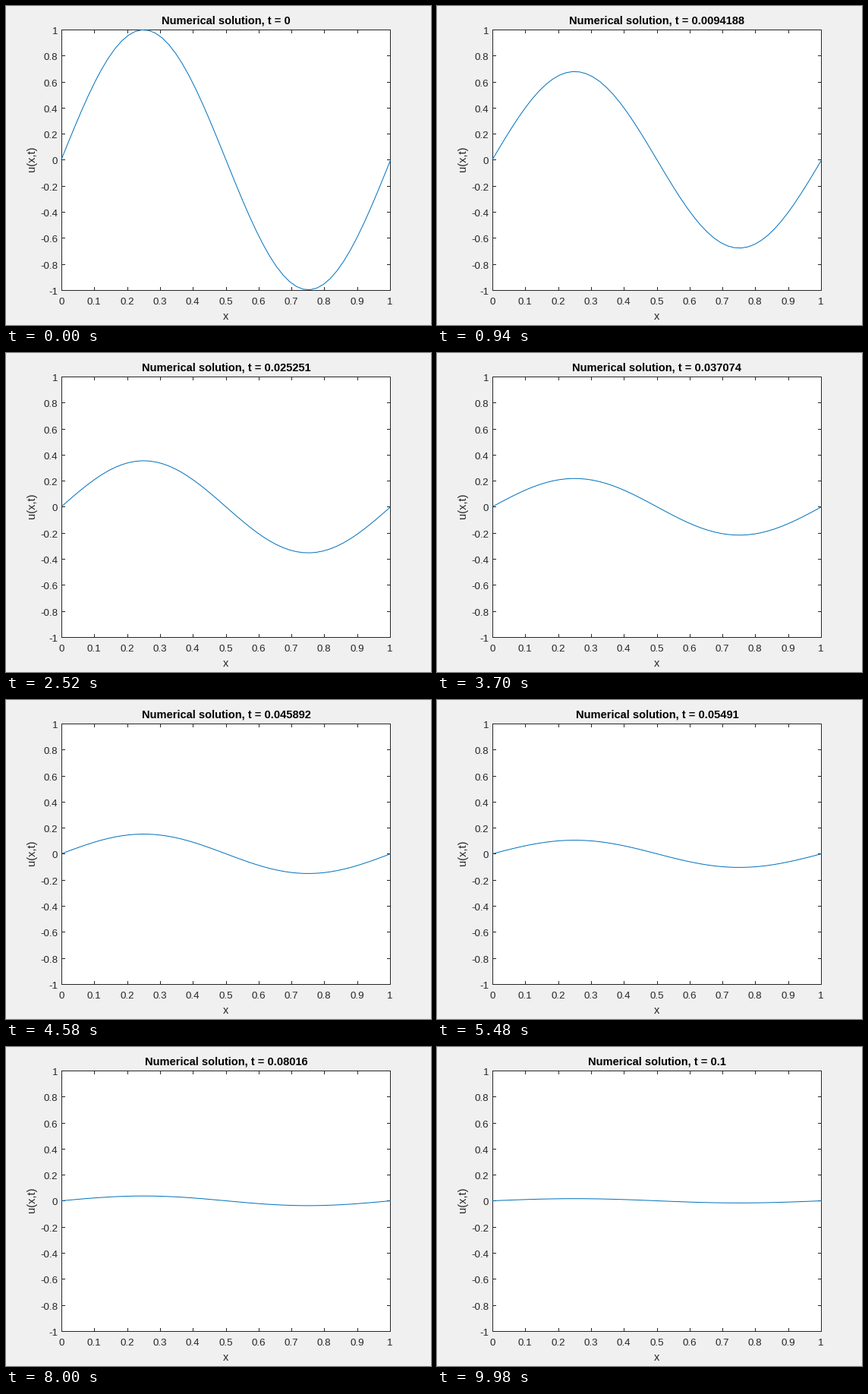
A matplotlib script that plays this animation: 560x420 px, repeating every 10000 ms.

```python
import math

import matplotlib.pyplot as plt
import numpy as np
from matplotlib.animation import FuncAnimation

W, H, DPI = 560, 420, 100
LEFT, RIGHT, TOP, BOTTOM = 73.5, 506.5, 31.5, 374.5  # frame, pixel centres
X0, X1 = 0.13 * W, 0.905 * W                         # data range on stage
MID, AMP = 202.5, 0.815 * H / 2
FRAMES = 500
T_END = 0.1
DECAY = 41.1
TICK = 4.5
INK = "#262626"
BLUE = "#0072BD"
PX = 72 / DPI  # one pixel in points

plt.rcParams["font.family"] = "Liberation Sans"

fig = plt.figure(figsize=(W / DPI, H / DPI), dpi=DPI, facecolor="#F0F0F0")
ax = fig.add_axes([0, 0, 1, 1])
ax.set_xlim(0, W)
ax.set_ylim(H, 0)
ax.axis("off")


def label(x, y, s, size, ha="center", color=INK, **kw):
    return ax.text(x, y, s, fontsize=size * PX, ha=ha, va="baseline",
                   color=color, **kw)


def stroke(x, y):
    ax.plot(x, y, color=INK, lw=PX, solid_capstyle="butt",
            solid_joinstyle="miter", snap=False, zorder=2)


def tick_pixels(start, end):
    return np.round(np.linspace(start - 0.5, end - 0.5, 11))


ax.fill([LEFT, RIGHT, RIGHT, LEFT], [TOP, TOP, BOTTOM, BOTTOM],
        color="white", lw=0, snap=False, zorder=1)
stroke([LEFT, RIGHT, RIGHT, LEFT, LEFT], [TOP, TOP, BOTTOM, BOTTOM, TOP])
stroke([LEFT - 0.5, LEFT + 0.5], [TOP, TOP])

for k, col in enumerate(tick_pixels(LEFT, RIGHT)):
    x = col + 0.5
    stroke([x, x], [BOTTOM, BOTTOM - TICK])
    stroke([x, x], [TOP, TOP + TICK])
    label(x - 0.4, 393, f"{k / 10:g}", 13.33)

for k, row in enumerate(tick_pixels(TOP, BOTTOM)):
    y = row + 0.5
    stroke([LEFT, LEFT + TICK], [y, y])
    stroke([RIGHT, RIGHT - TICK], [y, y])
    label(68, row + 6, f"{(5 - k) / 5:g}", 13.33, ha="right")

label(290, 413, "x", 14.67)
label(38, 201, "u(x,t)", 14.67, rotation=90, rotation_mode="anchor")
title = label(290, 24, "", 14.67, color="black", weight="bold")

grid = np.linspace(0, 1, 50)
wave = np.sin(2 * np.pi * grid)
curve, = ax.plot(X0 + (X1 - X0) * grid, MID - AMP * wave, color=BLUE, lw=PX,
                 solid_capstyle="butt", snap=False, zorder=3)


def draw(i):
    t = T_END * i / (FRAMES - 1)
    curve.set_ydata(MID - AMP * math.exp(-DECAY * t) * wave)
    title.set_text(f"Numerical solution, t = {t:.5g}")
    return curve, title


anim = FuncAnimation(fig, draw, frames=FRAMES, interval=20,
                     repeat=True, repeat_delay=0)
plt.show()
```
